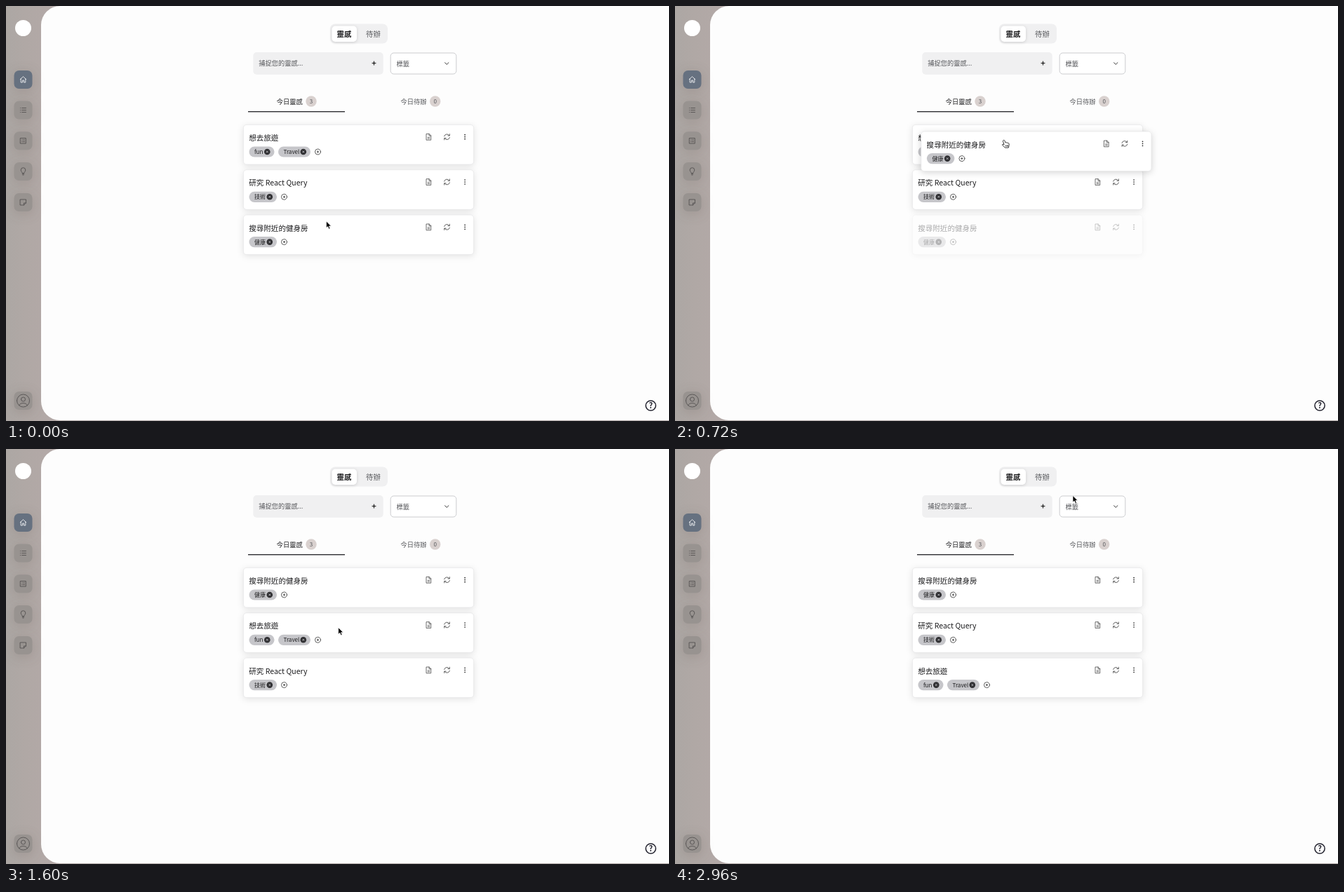
Write an HTML page that moves like this. It is 945x592 px and loops after 3040 ms.

```html
<!DOCTYPE html>
<html lang="zh-Hant">
<head>
<meta charset="utf-8">
<title>靈感</title>
<style>
  html, body { margin: 0; width: 100%; height: 100%; overflow: hidden; }
  svg { display: block; width: 100vw; height: 100vh; }
  text { font-family: "Noto Sans CJK TC", "Noto Sans CJK", "Noto Sans", sans-serif; font-size: 9.24px; font-weight: 500; fill: #1c1c1e; }
  .title { font-size: 10.56px; }
  .chip { font-size: 8.1px; }
  .mode { font-size: 10.4px; }
  .muted { fill: #55565a; }
  .line { fill: none; stroke: #333; stroke-width: .8; stroke-linecap: round; stroke-linejoin: round; }
  .nav .line { stroke: #4c4a49; }
  .nav { filter: drop-shadow(0 3px 9px rgba(60, 50, 45, .16)); }
  .card { filter: drop-shadow(0 2px 5px rgba(0, 0, 0, .11)); }
  #overlay { filter: drop-shadow(0 2px 5px rgba(0, 0, 0, .16)); }
</style>
</head>
<body>
<svg viewBox="0 0 945 592">
  <defs>
    <linearGradient id="side">
      <stop offset="0" stop-color="#aca7a4"/>
      <stop offset=".35" stop-color="#b0a8a5"/>
      <stop offset="1" stop-color="#b4a9a8"/>
    </linearGradient>
  </defs>
  <rect width="945" height="592" fill="#b0a7a6"/>
  <rect width="80" height="592" fill="url(#side)"/>
  <path d="M945 0H77A27 27 0 0 0 50 27V564A27 27 0 0 0 77 591H945Z" fill="#fdfdfd"/>
  <circle cx="24.5" cy="31.5" r="11.5" fill="#fff"/>
  <g id="nav"></g>

  <rect x="462" y="25.5" width="82" height="28" rx="7" fill="#f0f0f1"/>
  <rect x="464.5" y="28.5" width="35.5" height="22.5" rx="5" fill="#fff" style="filter:drop-shadow(0 1px 2px rgba(0,0,0,.14))"/>
  <text class="mode" x="471.5" y="43.7" style="font-weight:700">靈感</text>
  <text class="mode muted" x="513" y="43.7">待辦</text>

  <rect x="352.3" y="66" width="185.4" height="31.7" rx="5" fill="#f0f0f1"/>
  <text class="muted" x="360.3" y="85.1">捕捉您的靈感...</text>
  <path d="M522 81.5h5M524.5 79v5" class="line" style="stroke:#111;stroke-width:1.1"/>
  <rect x="548.2" y="67" width="93.6" height="30" rx="4.5" fill="#fff" stroke="#cbcccf"/>
  <text class="muted" x="556.5" y="85.6">標籤</text>
  <path d="M625.5 80.7l2.7 2.7l2.7 -2.7" class="line" style="stroke-width:1"/>

  <text x="385.8" y="139.7">今日靈感</text>
  <text class="muted" x="562.6" y="139.7">今日待辦</text>
  <g fill="#d9d1cf"><circle cx="435" cy="136" r="7.7"/><circle cx="611.7" cy="136" r="7.7"/></g>
  <g text-anchor="middle">
    <text class="chip muted" x="435" y="139">3</text>
    <text class="chip muted" x="611.7" y="139">0</text>
  </g>
  <rect x="345" y="150" width="138" height="1.4" fill="#2f2f33"/>

  <g id="cards"></g>
  <g id="overlay"></g>

  <circle cx="919" cy="570" r="7.1" fill="none" stroke="#22222e" stroke-width="1.5"/>
  <text x="919" y="574.1" text-anchor="middle" style="font-size:11px;font-weight:700;fill:#22222e">?</text>

  <path id="arrow" d="M0 0V9.6L2.2 7.6L3.8 11.2L5.5 10.4L4 7H7Z" fill="#000" stroke="#fff" stroke-width=".7"/>
  <path id="hand" d="M-.6 .2C.3 -.6 1.2 0 1.5 .9L2.6 3.6C3.4 2.9 4.2 3.2 4.5 3.8C5.3 3.2 6 3.6 6.2 4.2C7 3.8 7.6 4.3 7.6 5.2C7.8 7.6 7.4 8.6 6.8 10.6H1.8C1 9.2 -.8 8 -2 6.8C-2.4 5.8 -1.2 5.3 .6 6.4L-1 1.6C-1.2 1 -1 .5 -.6 .2ZM3.1 7v2M4.6 7v2M6 7v2" fill="#fff" stroke="#111" stroke-width=".85" stroke-linejoin="round"/>
</svg>

<script>
const LOOP = 3040, STEP = 80, DROP_TIME = 250;
const LEFT = 338.4, TOP = 169.4, PITCH = 64.3;
const $ = id => document.getElementById(id);

// Sidebar buttons: centre y, icon path around the origin
const home = "M-4.3 -.3L0 -4.3L4.3 -.3M-3.3 -1V4H-1V1H1V4H3.3V-1";
const list = "M-1.8 -3H4M-1.8 0H4M-1.8 3H4M-4 -3h.2M-4 0h.2M-4 3h.2";
const notes = "M-3.8 -3.8H3.8V3.8H-3.8ZM-2 -1.3h.6M0 -1.3h2M-2 1.3h.6M0 1.3h2";
const bulb = "M-1.3 2.2C-1.3 .8 -3.3 .2 -3.3 -2A3.3 3.3 0 0 1 3.3 -2C3.3 .2 1.3 .8 1.3 2.2ZM-1.2 3.8H1.2M-.6 5H.6";
const memo = "M-4 -4H4V1L1 4H-4ZM4 1H1V4";
const person = "M-9 0A9 9 0 1 1 9 0A9 9 0 1 1 -9 0M-3 -2A3 3 0 1 1 3 -2A3 3 0 1 1 -3 -2M-5.8 6.8C-5 2.2 5 2.2 5.8 6.8";
$("nav").innerHTML = [[105, home], [148.5, list], [192.3, notes], [236, bulb], [280, memo], [563, person]]
  .map(([y, icon]) => {
    const active = icon === home;
    return `<g class="nav" transform="translate(24.5 ${y})">
      <rect x="-13" y="-13" width="26" height="26" rx="7" fill="${active ? "#667180" : "#989390"}"/>
      <path class="line" d="${icon}" ${active ? 'style="stroke:#fff"' : ""}/></g>`;
  }).join("");

function chip(x, width, label) {
  const end = x + width - 10.2;
  return `<rect x="${x}" y="31" width="${width}" height="15.2" rx="7.6" fill="#c6c6ca"/>
    <text class="chip" x="${x + 7.5}" y="41.7">${label}</text>
    <circle cx="${end}" cy="38.6" r="4.3" fill="#303033"/>
    <path d="M${end - 1.3} 37.3l2.6 2.6m0 -2.6l-2.6 2.6" stroke="#d0d0d4" stroke-width=".8"/>`;
}

function cardBody({ title, tags }) {
  let x = 8.1, chips = "";
  for (const [label, width] of tags) {
    chips += chip(x, width, label);
    x += width + 5.5;
  }
  const add = x + 5;
  return `<rect width="328.2" height="56.6" rx="4.5" fill="#fff" stroke="#e4e4e6" stroke-width=".7"/>
    <text class="title" x="7.8" y="22.5">${title}</text>${chips}
    <g class="line">
      <circle cx="${add}" cy="38.6" r="4"/>
      <path d="M${add - 1.3} 38.6h2.6m-1.3 -1.3v2.6"/>
      <path d="M261 13h3.8l2.5 2.5v6.3h-6.3ZM264.6 13v2.7h2.7M262.7 18h2.8M262.7 19.8h2.8" stroke-width=".7"/>
      <path d="M286.2 16.5A4 4 0 0 1 293.5 15.4M293.9 13.2v2.4h-2.4M294 18.1A4 4 0 0 1 286.7 19.3M286.3 21.5v-2.4h2.4" stroke-width=".75"/>
    </g>
    <g fill="#222"><circle cx="315.7" cy="14.3" r=".85"/><circle cx="315.7" cy="17.3" r=".85"/><circle cx="315.7" cy="20.3" r=".85"/></g>`;
}

const cards = [
  { title: "想去旅遊", tags: [["fun", 36], ["Travel", 46]] },
  { title: "研究 React Query", tags: [["技術", 39.5]] },
  { title: "搜尋附近的健身房", tags: [["健康", 39.5]] },
];
$("cards").innerHTML = cards.map(c => `<g class="card">${cardBody(c)}</g>`).join("");
const cardNodes = [...$("cards").children];

// Slots of each card before and after every drop; path rows are time, dx, dy
const drags = [
  { card: 2, start: 160, drop: 780, from: [0, 1, 2], to: [1, 2, 0],
    path: [[160, 1, -12], [240, 4, -38], [320, 8, -66], [400, 10.3, -87.3], [560, 11.7, -111], [720, 12.4, -119]] },
  { card: 0, start: 1840, drop: 2422, from: [1, 2, 0], to: [2, 1, 0],
    path: [[1840, 1, 6], [1920, 4, 24], [2000, 5.2, 43], [2080, 5, 60], [2160, 4.2, 65.7]] },
];

const cursorPath = [
  [0, 456.5, 307], [80, 457, 306], [160, 459, 291], [240, 462, 264], [400, 466.5, 218], [560, 468, 199], [720, 468.5, 191.5],
  [800, 469.5, 192], [960, 471.5, 205], [1040, 472, 208.5], [1200, 472.5, 216], [1440, 473, 240], [1680, 474, 262], [1760, 474, 262],
  [1840, 474.3, 274], [2000, 475.5, 318], [2080, 476.5, 327], [2160, 477, 329], [2480, 477, 329], [2560, 479, 322],
  [2720, 490, 255], [2880, 515.5, 163], [2960, 567, 66.5],
];

const lerp = (a, b, p) => a + (b - a) * p;

function along(path, t) {
  const i = path.findIndex(k => k[0] > t);
  if (i < 0) return path[path.length - 1].slice(1);
  if (i === 0) return path[0].slice(1);
  const [t0, x0, y0] = path[i - 1], [t1, x1, y1] = path[i];
  const p = (t - t0) / (t1 - t0);
  return [lerp(x0, x1, p), lerp(y0, y1, p)];
}

// cubic-bezier(.25, .1, .25, 1), solved by bisection
function ease(p) {
  if (p <= 0) return 0;
  if (p >= 1) return 1;
  const bezier = (a, b, s) => 3 * a * s * (1 - s) ** 2 + 3 * b * s * s * (1 - s) + s ** 3;
  let low = 0, high = 1;
  for (let i = 0; i < 20; i++) {
    const mid = (low + high) / 2;
    if (bezier(.25, .25, mid) < p) low = mid; else high = mid;
  }
  return bezier(.1, 1, low);
}

const place = (node, x, y) => node.setAttribute("transform", `translate(${x} ${y})`);
const show = (node, on) => node.setAttribute("visibility", on ? "visible" : "hidden");
const slotY = slot => TOP + slot * PITCH;

let overlayCard = -1;
function draw(t) {
  const drag = t < 1200 ? drags[0] : drags[1];
  const dropped = ease((t - drag.drop) / DROP_TIME);
  const dragging = t >= drag.start && dropped < 1;

  cardNodes.forEach((node, i) => {
    const held = dragging && i === drag.card;
    const y = held ? slotY(drag.from[i]) : lerp(slotY(drag.from[i]), slotY(drag.to[i]), dropped);
    place(node, LEFT, y);
    node.setAttribute("opacity", !held ? 1 : t < drag.drop ? .36 : 0);
  });

  show($("overlay"), dragging);
  if (dragging) {
    if (overlayCard !== drag.card) {
      overlayCard = drag.card;
      $("overlay").innerHTML = cardBody(cards[overlayCard]);
    }
    const [dx, dy] = along(drag.path, t);
    place($("overlay"), LEFT + dx * (1 - dropped),
      lerp(slotY(drag.from[overlayCard]) + dy, slotY(drag.to[overlayCard]), dropped));
  }

  const [x, y] = along(cursorPath, t);
  const pointing = t >= 160 && t < 880;
  place($("arrow"), x, y);
  place($("hand"), x, y);
  show($("arrow"), !pointing);
  show($("hand"), pointing);
}

const begin = performance.now();
function tick() {
  const t = (performance.now() - begin) % LOOP;
  draw(Math.floor(t / STEP) * STEP);
  requestAnimationFrame(tick);
}
tick();
</script>
</body>
</html>
```
